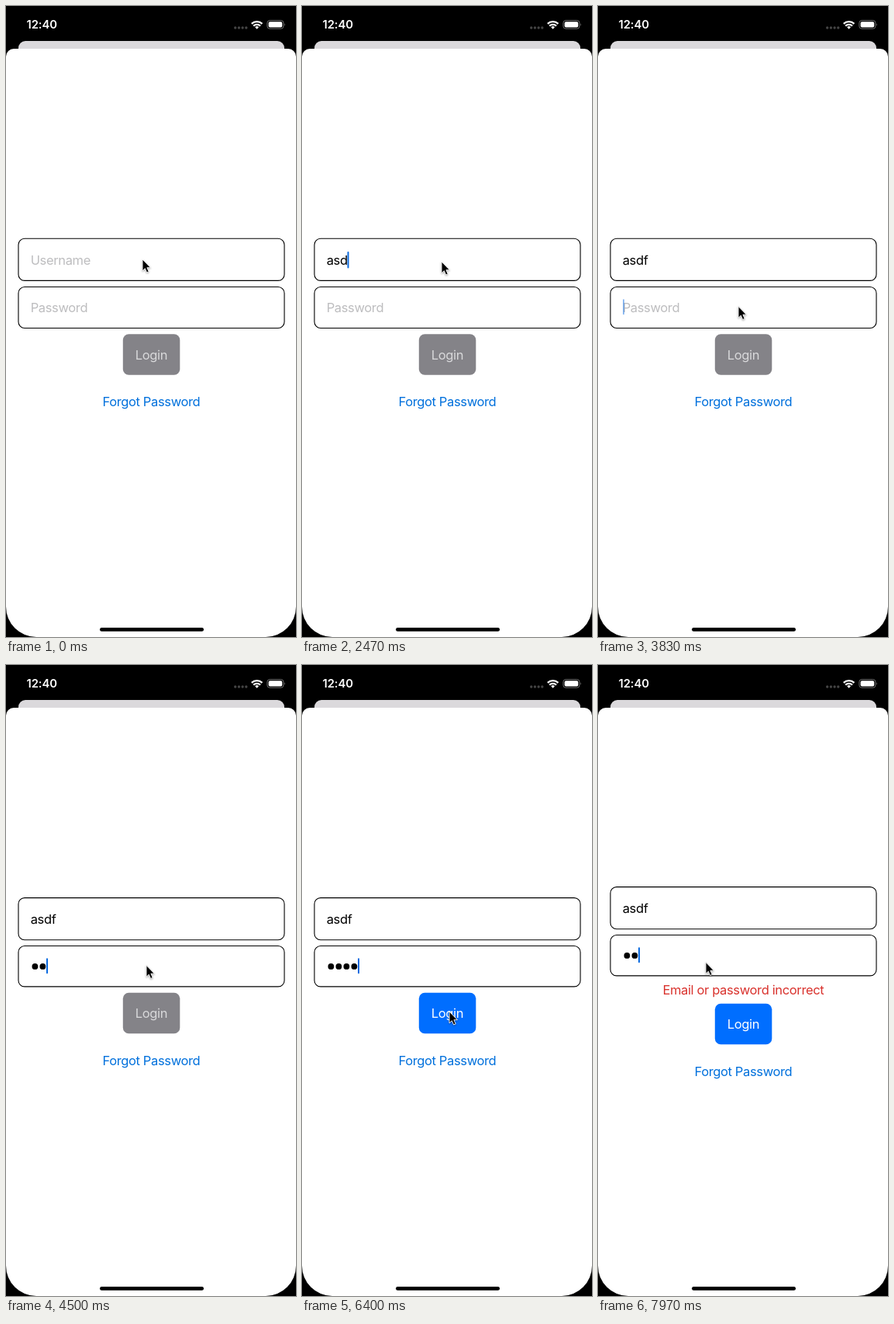
Animation, 374 px wide and 812 px high, one loop 8 s. Source, as an HTML page:

```html
<!DOCTYPE html>
<html lang="en">
<head>
<meta charset="utf-8">
<title>Login form</title>
<style>
  html, body { margin: 0; width: 100%; height: 100%; overflow: hidden; background: #000; }
  svg { display: block; width: 374px; height: 812px; }
  text { font: 400 16.5px Inter, Roboto, sans-serif; letter-spacing: -.36px; white-space: pre; }
  .mid { text-anchor: middle; }
  .hint { fill: #bdbdbf; }
  .field { fill: none; stroke: #000; stroke-width: 1.1; }
  .link { fill: #0070dc; }
  .caret { fill: #0a6ae0; }
  #clock { font-size: 14.8px; font-weight: 600; letter-spacing: -.1px; fill: #fff; }
  #error { fill: #d9322d; }
  #pointer path { filter: drop-shadow(0 1px 1px rgba(0, 0, 0, .35)); }
</style>
</head>
<body>
<svg viewBox="0 0 374 812">
  <rect width="374" height="812"/>

  <!-- status bar -->
  <text id="clock" x="26.5" y="29.3">12:40</text>
  <g fill="#454545">
    <circle cx="295.7" cy="28" r="1.7"/><circle cx="300.4" cy="28" r="1.7"/>
    <circle cx="305.1" cy="28" r="1.7"/><circle cx="309.8" cy="28" r="1.7"/>
  </g>
  <g fill="none" stroke="#fff" stroke-width="2.3">
    <path d="M316.8 22.8a9.8 9.8 0 0 1 13.6 0"/>
    <path d="M319.2 25.6a6.4 6.4 0 0 1 8.8 0"/>
    <path d="M321.2 27.2a3.4 3.4 0 0 1 4.8 0L323.6 29.8Z" fill="#fff" stroke="none"/>
  </g>
  <rect x="336.9" y="18.6" width="21" height="10.6" rx="3.2" fill="none" stroke="#707070"/>
  <rect x="338.6" y="20.3" width="17.6" height="7.2" rx="1.8" fill="#fff"/>
  <path d="M359.1 22.2q1.6 1.7 0 3.5Z" fill="#808080"/>

  <!-- sheets -->
  <rect x="16" y="45" width="343" height="30" rx="9" fill="#dbd9dc"/>
  <path d="M0 65a10 10 0 0 1 10-10H364a10 10 0 0 1 10 10V773a39 39 0 0 1-39 39H39a39 39 0 0 1-39-39Z" fill="#fff"/>
  <rect x="121" y="800" width="134" height="4.8" rx="2.4"/>

  <g id="user">
    <rect class="field" x="16" y="299.2" width="343" height="54.2" rx="8"/>
    <text class="hint" id="userHint" x="31.7" y="332.8">Username</text>
    <text id="name" x="31.7" y="332.8"></text>
    <rect class="caret" id="userCaret" y="316" width="2" height="21.5" rx="1"/>
  </g>

  <g id="pass">
    <rect class="field" id="passBox" x="16" y="361.5" width="343" height="53" rx="8"/>
    <text class="hint" id="passHint" x="31.7" y="393.9">Password</text>
    <g id="dots"></g>
    <rect class="caret" id="passCaret" y="377.2" width="2" height="20" rx="1"/>
  </g>

  <text class="mid" id="error" x="187.4" y="424">Email or password incorrect</text>

  <g id="actions">
    <rect id="button" x="150.8" y="422.2" width="73.5" height="52.5" rx="7.5"/>
    <text class="mid" id="label" x="187.4" y="454.6">Login</text>
    <text class="mid link" x="187.4" y="515">Forgot Password</text>
  </g>

  <g id="pointer">
    <path d="M0 0V14.8L3.3 11.7 5.6 17 8.2 15.9 5.9 10.7H10.4Z" stroke="#fff" stroke-width=".9"/>
  </g>
</svg>

<script>
const LOOP = 8000;
const $ = id => document.getElementById(id);
const count = (times, t) => times.filter(at => t >= at).length;
const show = (id, on) => $(id).style.display = on ? '' : 'none';
const shift = (id, x, y) => $(id).setAttribute('transform', `translate(${x} ${y})`);

const focusUser = 430, focusPass = 3430, enabled = 4800, failed = 6600;
const letters = [1700, 2020, 2330, 2670];
const bullets = [4220, 4390, 4590, 6270];
const deletes = [7700, 7800];
// every edit or tap restarts the caret's blink
const resets = [focusUser, ...letters, focusPass, ...bullets, 7455, ...deletes];

// start, end, x, y
const moves = [
  [30, 400, 180, 329], [2880, 3380, 181, 386.5], [4800, 5550, 183, 390.5],
  [5700, 6400, 190, 446], [6430, 6800, 191, 441],
  [6860, 7250, 158, 442], [7250, 7330, 139, 382.5]
];

for (let i = 0; i < bullets.length; i++) {
  const dot = document.createElementNS('http://www.w3.org/2000/svg', 'circle');
  dot.setAttribute('cx', 37.4 + 10 * i);
  dot.setAttribute('cy', 387.9);
  dot.setAttribute('r', 3.9);
  $('dots').append(dot);
}

function pointerAt(t) {
  let x = 176, y = 326;
  for (const [start, end, toX, toY] of moves) {
    const p = Math.min(1, Math.max(0, (t - start) / (end - start)));
    const k = p * p * (3 - 2 * p);
    x += (toX - x) * k;
    y += (toY - y) * k;
  }
  return [x, y];
}

function blink(t) {
  const age = (t - resets[count(resets, t) - 1]) % 1000;
  const alpha = age < 640 ? 1 - (age - 170) / 430 : (age - 680) / 250;
  return Math.min(1, Math.max(0, alpha));
}

function draw(t) {
  const typed = count(letters, t);
  const dots = count(bullets, t) - count(deletes, t);
  const secure = t >= bullets[0], error = t >= failed, active = t >= enabled;

  show('userHint', !typed);
  $('name').textContent = 'asdf'.slice(0, typed);
  show('passHint', !secure);
  [...$('dots').children].forEach((dot, i) => dot.style.display = i < dots ? '' : 'none');

  // the centred stack is a little shorter once the hint gives way to bullets
  const trim = secure ? .4 : 0, lift = error ? 14 : 0;
  shift('user', 0, trim - lift);
  shift('pass', 0, -lift);
  shift('actions', 0, lift - trim);
  $('passBox').setAttribute('height', 53 - 1.5 * trim);
  show('error', error);

  $('button').setAttribute('fill', active ? '#006eff' : '#848388');
  $('label').setAttribute('fill', active ? '#fff' : '#d9d9db');

  show('userCaret', t >= focusUser && t < focusPass);
  show('passCaret', t >= focusPass);
  $('userCaret').setAttribute('x', typed ? 31.5 + $('name').getComputedTextLength() : 32);
  $('passCaret').setAttribute('x', 32 + 10 * dots);
  if (t >= focusUser) $('userCaret').style.opacity = $('passCaret').style.opacity = blink(t);

  shift('pointer', ...pointerAt(t));
}

const begin = performance.now();
function tick() {
  draw((performance.now() - begin) % LOOP);
  requestAnimationFrame(tick);
}
tick();
</script>
</body>
</html>
```
